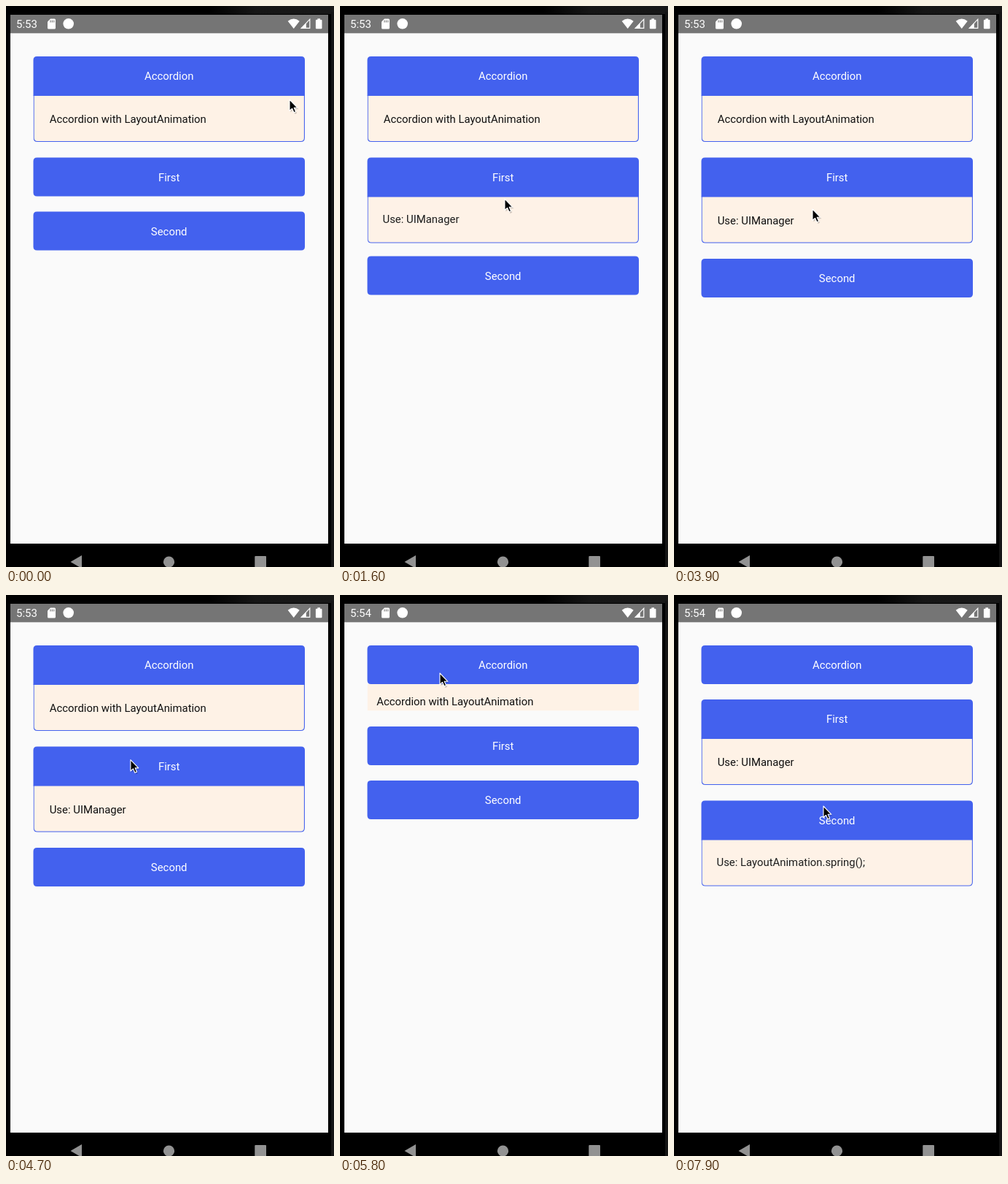
Write an HTML page that moves like this. It is 450x768 px and loops after 8000 ms.

```html
<!DOCTYPE html>
<html lang="en">
<head>
<meta charset="utf-8">
<title>Accordion</title>
<style>
  html, body { margin: 0; width: 100%; height: 100%; overflow: hidden; background: #000; }
  svg { display: block; width: 450px; height: 768px; }
  text { font: 14.9px Roboto, sans-serif; }
  .label { fill: #fff; text-anchor: middle; }
  .copy { fill: #111; }
</style>
</head>
<body>
<svg viewBox="0 0 450 768">
  <defs>
    <linearGradient id="bezel">
      <stop offset="0.62" stop-color="#000"/>
      <stop offset="0.76" stop-color="#161616"/>
      <stop offset="1" stop-color="#181818"/>
    </linearGradient>
  </defs>
  <rect width="450" height="768"/>
  <rect width="450" height="11" fill="url(#bezel)"/>
  <rect x="446" y="8" width="4" height="760" fill="#141414"/>
  <rect x="6" y="12" width="436" height="724" fill="#fafafa"/>
  <rect x="6" y="12" width="436" height="25.3" fill="#757575"/>

  <g fill="#fff">
    <text id="clock" x="14" y="30" style="font-size:15px"></text>
    <path d="M61 17.5H66.5Q68 17.5 68 19V30Q68 31.5 66.5 31.5H58.5Q57 31.5 57 30V21.5Z"/>
    <path d="M61 19.5v3M63.4 19.5v3M65.8 19.5v3" stroke="#757575" stroke-width="1.1"/>
    <circle cx="85.7" cy="24.3" r="7.3"/>
    <path d="M386.7 20.8Q394.7 14.2 402.7 20.8L394.7 31Z"/>
    <path d="M416.8 18.2V30.4H405.2Z" fill="none" stroke="#fff" stroke-width="1.2"/>
    <path d="M411.8 23.6V30.6H405Z"/>
    <path d="M427.4 17.3h3.6v1.5h1.5q1 0 1 1v10.5q0 1-1 1h-6.600q-1 0-1-1v-10.500q0-1 1-1h1.500z"/>
  </g>

  <g id="list"></g>

  <g fill="#929292">
    <path d="M88.500 761L104 752V770Z"/>
    <circle cx="223.500" cy="761" r="7.600"/>
    <rect x="341.300" y="753" width="15.700" height="16" rx="1"/>
  </g>

  <g id="cursor">
    <path d="M1.500 2V17.500L5 14.300 7.500 20 10.200 18.800 7.800 13.300H12.500Z" fill="#000" opacity=".18"/>
    <path d="M0 0V15.500L3.500 12.300 6 17.800 8.600 16.700 6.200 11.300H10.900Z" stroke="#fff" stroke-width="1.100" stroke-linejoin="round"/>
  </g>
</svg>
<script>
const LOOP = 8000, STEP = 100, SLIDE = 500;
const LEFT = 37.5, WIDTH = 372.5, HEAD = 53, BODY = 64, GAP = 21, PAD = 22;
const BLUE = '#4361ee', CREAM = '#fef2e6';

// toggles: times at which a panel flips between closed and open
const panels = [
  { title: 'Accordion', copy: 'Accordion with LayoutAnimation', open: true, toggles: [5573] },
  { title: 'First', copy: 'Use: UIManager', open: false, toggles: [1175, 4740, 6580] },
  { title: 'Second', copy: 'Use: LayoutAnimation.spring();', open: false, toggles: [2175, 3075, 7475] }
];

// time, x, y of the pointer tip
const path = [
  [0, 389, 128], [400, 233, 251], [1200, 233, 251], [1600, 226, 264],
  [2100, 222, 364], [3200, 218, 366], [3900, 190, 278], [4100, 182, 270],
  [4200, 182, 270], [4500, 175, 241], [4600, 175, 241], [5100, 132, 79],
  [5300, 133, 77], [5500, 133, 77], [5800, 137, 107], [6400, 184, 172],
  [6500, 184, 172], [6800, 196, 253], [7200, 205, 289], [LOOP, 205, 289]
];

const $ = id => document.getElementById(id);

function add(parent, tag, attrs, content) {
  const el = document.createElementNS('http://www.w3.org/2000/svg', tag);
  set(el, attrs);
  if (content) el.textContent = content;
  return parent.appendChild(el);
}

function set(el, attrs) {
  for (const key in attrs) el.setAttribute(key, attrs[key]);
}

const ease = x => 0.5 - 0.5 * Math.cos(Math.PI * Math.min(1, Math.max(0, x)));

function box(x, y, w, h, top, bottom) {
  return `M${x} ${y + top}q0 ${-top} ${top} ${-top}h${w - 2 * top}q${top} 0 ${top} ${top}` +
    `v${h - top - bottom}q0 ${bottom} ${-bottom} ${bottom}h${2 * bottom - w}q${-bottom} 0 ${-bottom} ${-bottom}z`;
}

panels.forEach((p, i) => {
  p.group = add($('list'), 'g', {});
  const clip = add(p.group, 'clipPath', { id: 'clip' + i });
  p.mask = add(clip, 'rect', { x: LEFT, y: HEAD, width: WIDTH });
  p.body = add(p.group, 'g', { 'clip-path': `url(#clip${i})` });
  p.back = add(p.body, 'path', { fill: CREAM, 'stroke-width': 1.1 });
  p.text = add(p.body, 'text', { class: 'copy' }, p.copy);
  p.head = add(p.group, 'path', { fill: BLUE });
  add(p.group, 'text', { class: 'label', x: 223.7, y: 32.2 }, p.title);
});

function panelState(p, t) {
  let open = p.open, amount = open ? 1 : 0;
  for (const at of p.toggles) {
    if (t < at) break;
    open = !open;
    const k = ease((t - at) / SLIDE);
    amount = open ? k : 1 - k;
  }
  return { open, amount };
}

function drawPanel(p, y, { open, amount }) {
  set(p.group, { transform: `translate(0 ${y})` });
  set(p.head, { d: box(LEFT, 0, WIDTH, open ? HEAD + 1 : HEAD, 5, open ? 0 : 5) });
  // an opening body fades in at full size, a closing one shrinks without its border
  const height = open ? BODY : BODY * amount;
  set(p.mask, { height: height + (open ? 1 : 0) });
  set(p.body, { opacity: open ? amount : 1, display: amount ? 'inline' : 'none' });
  set(p.back, {
    d: open ? box(LEFT + 0.6, HEAD, WIDTH - 1.2, BODY - 0.5, 0, 5) : box(LEFT, HEAD, WIDTH, height, 0, 0),
    stroke: open ? BLUE : 'none'
  });
  set(p.text, { x: 37.7 + PAD * amount, y: HEAD + 16 + PAD * amount });
}

function pointer(t) {
  const i = path.findIndex(k => k[0] > t);
  const [t0, x0, y0] = path[i - 1], [t1, x1, y1] = path[i];
  const k = ease((t - t0) / (t1 - t0));
  return [x0 + (x1 - x0) * k, y0 + (y1 - y0) * k];
}

function draw(t) {
  let y = 69;
  for (const p of panels) {
    const state = panelState(p, t);
    drawPanel(p, y, state);
    y += HEAD + GAP + (BODY + 0.5) * state.amount;
  }
  $('clock').textContent = t < 5700 ? '5:53' : '5:54';
  set($('cursor'), { transform: `translate(${pointer(t)})` });
}

function tick() {
  const t = performance.now() % LOOP;
  draw(Math.floor(t / STEP) * STEP);
  requestAnimationFrame(tick);
}
tick();
</script>
</body>
</html>
```
